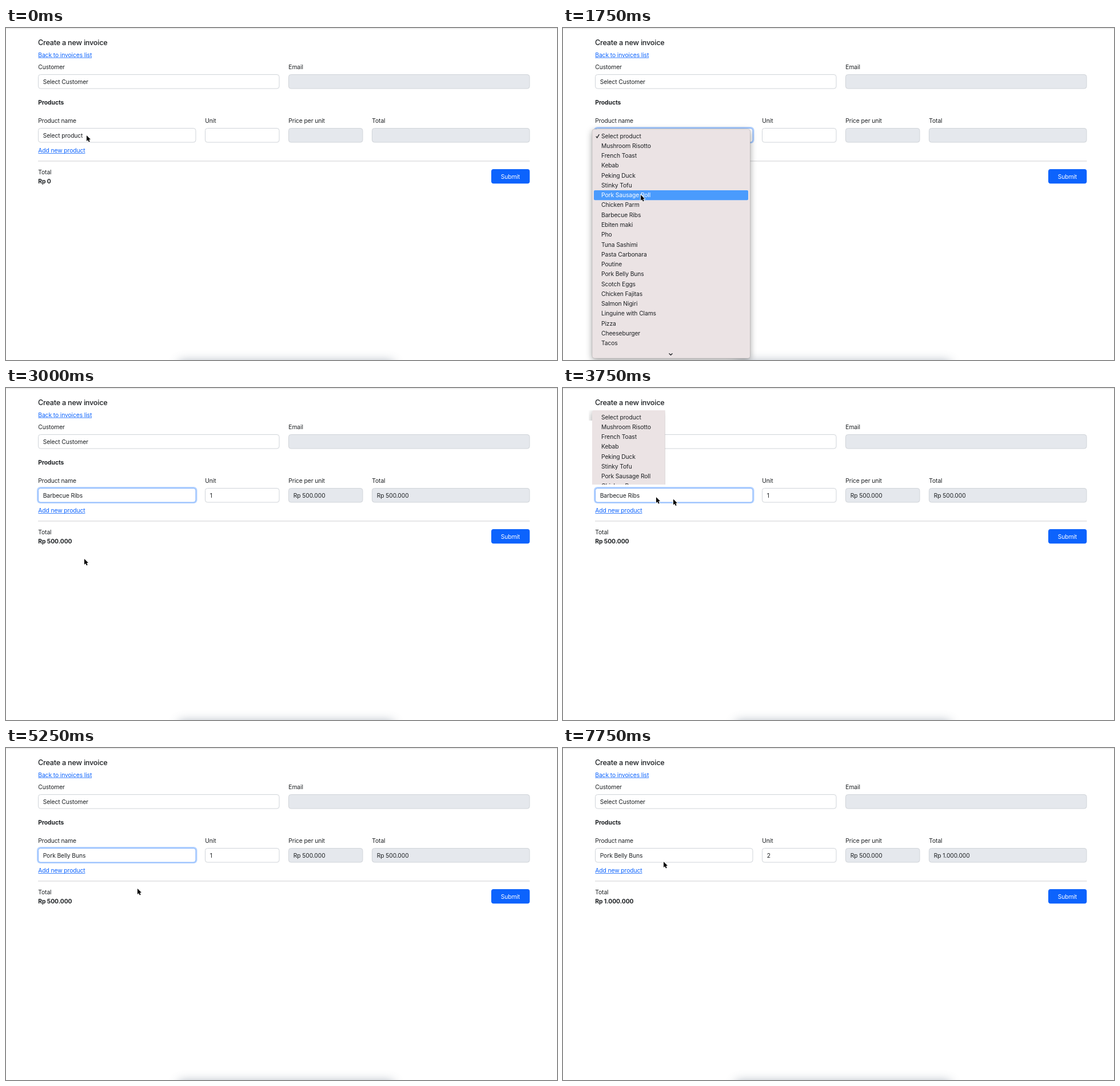
These frames come from a looping animation (964 by 581 pixels, 8 s). An HTML page with a canvas:

```html
<!DOCTYPE html>
<html lang="en">
<head>
<meta charset="utf-8">
<title>Create a new invoice</title>
<style>
html, body { margin: 0; width: 100%; height: 100%; overflow: hidden; background: #fff; }
canvas { display: block; }
</style>
</head>
<body>
<canvas id="stage" width="964" height="581"></canvas>
<script>
const ctx = document.getElementById('stage').getContext('2d');
const LOOP = 8000;
const ROW = 17.27;
const FAMILY = 'Inter, "Liberation Sans", sans-serif';
const INK = '#1d2023', BLUE = '#0c63fd', MENU = '#ebe3e4';

const dishes = ['Select product', 'Mushroom Risotto', 'French Toast', 'Kebab', 'Peking Duck',
  'Stinky Tofu', 'Pork Sausage Roll', 'Chicken Parm', 'Barbecue Ribs', 'Ebiten maki', 'Pho',
  'Tuna Sashimi', 'Pasta Carbonara', 'Poutine', 'Pork Belly Buns', 'Scotch Eggs',
  'Chicken Fajitas', 'Salmon Nigiri', 'Linguine with Clams', 'Pizza', 'Cheeseburger', 'Tacos',
  'Teriyaki Chicken Donburi', 'Tiramisù', 'Pappardelle alla Bolognese', 'Scotch Eggs',
  'Teriyaki Chicken Donburi', 'Poke', 'Chicken Wings', 'Chicken Milanese'];

// Each step changes part of the state and holds until the next one.
const steps = [
  { at: 0, cursor: [141, 188], product: 0, unit: '', price: '', total: '', sum: 'Rp 0', focus: '' },
  { at: 250, cursor: [130, 190.5] },
  { at: 750, menuTop: 177, hover: 0, focus: 'product', ring: 0.4 },
  { at: 1250, cursor: [131, 215], hover: 2, ring: 1 },
  { at: 1500, cursor: [133, 256], hover: 4 },
  { at: 1750, cursor: [136, 292], hover: 6 },
  { at: 2000, cursor: [137, 299], menuTop: 163, hover: 7 },
  { at: 2250, menuTop: 148, hover: 8 },
  { at: 3000, menuTop: null, product: 8, unit: '1', price: 'Rp 500.000', total: 'Rp 500.000', sum: 'Rp 500.000' },
  { at: 3250, cursor: [148, 250] },
  { at: 3500, cursor: [163, 191] },
  { at: 3750, cursor: [193, 194.5], ghost: [163, 191], menuTop: 39, partial: true, hover: -1 },
  { at: 4000, cursor: [172, 272], ghost: null, partial: false, hover: 13 },
  { at: 4250, cursor: [166, 299], hover: 14 },
  { at: 4750, cursor: [166, 290] },
  { at: 5000, menuTop: null, product: 14 },
  { at: 5250, cursor: [230, 246] },
  { at: 5500, cursor: [318, 206] },
  { at: 5750, cursor: [384, 192], spinner: true },
  { at: 6000, focus: 'unit', caret: true },
  { at: 6250, unit: '' },
  { at: 6500, unit: '2' },
  { at: 7000, cursor: [376, 238], spinner: false },
  { at: 7250, cursor: [320, 300], focus: '', caret: false, total: 'Rp 1.000.000', sum: 'Rp 1.000.000' },
  { at: 7500, cursor: [236, 256] },
  { at: 7750, cursor: [176, 199] }
];

const stateAt = t => Object.assign({}, ...steps.filter(s => s.at <= t));

function text(str, x, y, { size = 10.3, weight = 400, color = INK, spacing = -0.1, align = 'left' } = {}) {
  ctx.font = `${weight} ${size}px ${FAMILY}`;
  ctx.letterSpacing = spacing + 'px';
  ctx.textAlign = align;
  ctx.fillStyle = color;
  ctx.fillText(str, x, y);
  return ctx.measureText(str).width;
}

const bold = (str, x, y) => text(str, x, y, { weight: 700, spacing: -0.05 });

function link(str, x, y) {
  const width = text(str, x, y, { color: BLUE });
  ctx.fillRect(x, y + 1.2, width, 0.8);
}

function round(x, y, w, h, r) {
  ctx.beginPath();
  ctx.roundRect(x, y, w, h, r);
}

function field(x, y, w, value, { disabled, ring = 0 } = {}) {
  if (ring) {
    round(x - 2, y - 2, w + 4, 29, 6);
    ctx.fillStyle = `rgba(13, 110, 253, ${0.3 * ring})`;
    ctx.fill();
  }
  round(x + 0.5, y + 0.5, w - 1, 24.5, 4);
  ctx.fillStyle = disabled ? '#e5e8ed' : '#fff';
  ctx.fill();
  ctx.lineWidth = 1;
  ctx.strokeStyle = ring ? '#80b1fd' : '#d0d4d9';
  ctx.stroke();
  text(value, x + 8.7, y + 16.7);
}

function polyline(points, x = 0, y = 0) {
  ctx.beginPath();
  points.forEach(([px, py]) => ctx.lineTo(x + px, y + py));
}

function drawCursor([x, y]) {
  polyline([[0, 0], [0, 10], [2.3, 7.9], [3.9, 11.5], [5.7, 10.7], [4.1, 7.2], [7, 7]], x, y);
  ctx.closePath();
  ctx.lineWidth = 1.6;
  ctx.strokeStyle = '#fff';
  ctx.stroke();
  ctx.fillStyle = '#000';
  ctx.fill();
}

function drawSpinner() {
  round(460, 181, 9.5, 14, 2);
  ctx.fillStyle = '#ececec';
  ctx.fill();
  ctx.fillStyle = '#444';
  for (const dir of [-1, 1]) {
    polyline([[-2.2, 0], [2.2, 0], [0, dir * 2.6]], 464.7, 188 + dir * 2.6);
    ctx.fill();
  }
}

function drawDockShadow() {
  ctx.save();
  ctx.shadowColor = 'rgba(55, 75, 100, 0.42)';
  ctx.shadowBlur = 17;
  ctx.fillRect(303, 583, 374, 40);
  ctx.restore();
}

function drawMenu({ menuTop, hover, product, partial }) {
  ctx.save();
  if (partial) {
    ctx.beginPath();
    ctx.rect(45, 39, 6, 18);
    ctx.rect(51, 39, 127.5, 130);
    ctx.clip();
  }
  ctx.save();
  ctx.shadowColor = 'rgba(0, 0, 0, 0.38)';
  ctx.shadowBlur = 12;
  ctx.shadowOffsetY = 3;
  ctx.fillStyle = MENU;
  round(51, menuTop, 276.5, 578 - menuTop, 4);
  ctx.fill();
  ctx.restore();
  ctx.lineWidth = 0.6;
  ctx.strokeStyle = 'rgba(0, 0, 0, 0.2)';
  if (!partial) ctx.stroke();

  dishes.forEach((dish, i) => {
    const y = menuTop + 12 + i * ROW;
    if (y > 560) return;
    const color = i === hover ? '#fff' : INK;
    if (i === hover) {
      round(54, y - 8.6, 270, ROW, 2);
      ctx.fillStyle = '#4a9bfd';
      ctx.fill();
    }
    if (i === product && !partial) {
      polyline([[57.8, 0.6], [59.7, 3], [63.3, -2.8]], 0, y);
      ctx.lineWidth = 1.3;
      ctx.strokeStyle = color;
      ctx.stroke();
    }
    text(dish, 67, y + 3.6, { color });
  });

  polyline([[185.5, 569.5], [188.5, 572.3], [191.5, 569.5]]);
  ctx.lineWidth = 1.3;
  ctx.strokeStyle = INK;
  ctx.stroke();
  ctx.restore();
}

function drawPage(s) {
  ctx.fillStyle = '#fff';
  ctx.fillRect(0, 0, 964, 581);
  ctx.fillStyle = '#e9e9e9';
  ctx.fillRect(0, 0, 964, 1.6);
  drawDockShadow();

  text('Create a new invoice', 56, 30.3, { size: 12.7, weight: 500, spacing: -0.25 });
  link('Back to invoices list', 56.3, 50.5);
  text('Customer', 56.3, 71.7);
  text('Email', 494.3, 71.7);
  field(56, 81, 422.5, 'Select Customer');
  field(494, 81, 422.5, '', { disabled: true });

  bold('Products', 56.3, 134);
  text('Product name', 56.3, 166);
  text('Unit', 348.3, 166);
  text('Price per unit', 494.3, 166);
  text('Total', 640.3, 166);
  const ringOf = name => s.focus === name ? s.ring : 0;
  field(56, 175, 276.5, dishes[s.product], { ring: ringOf('product') });
  field(348, 175, 130.5, s.unit, { ring: ringOf('unit') });
  field(494, 175, 130.5, s.price, { disabled: true });
  field(640, 175, 276.5, s.total, { disabled: true });
  if (s.spinner) drawSpinner();
  if (s.caret) {
    ctx.fillStyle = '#000';
    ctx.fillRect(s.unit ? 363 : 357, 182, 0.9, 12.5);
  }

  link('Add new product', 56.3, 217.8);
  ctx.fillStyle = '#cfd0d1';
  ctx.fillRect(56, 232.4, 860.5, 1);
  text('Total', 56.3, 255.7);
  bold(s.sum, 56.3, 271.7);
  round(849, 247, 67.3, 25.3, 4);
  ctx.fillStyle = BLUE;
  ctx.fill();
  text('Submit', 882.5, 263.6, { color: '#fff', align: 'center' });
}

function frame(now) {
  const s = stateAt(now % LOOP);
  drawPage(s);
  if (s.menuTop) drawMenu(s);
  if (s.ghost) drawCursor(s.ghost);
  drawCursor(s.cursor);
  requestAnimationFrame(frame);
}
frame(performance.now());
</script>
</body>
</html>
```
